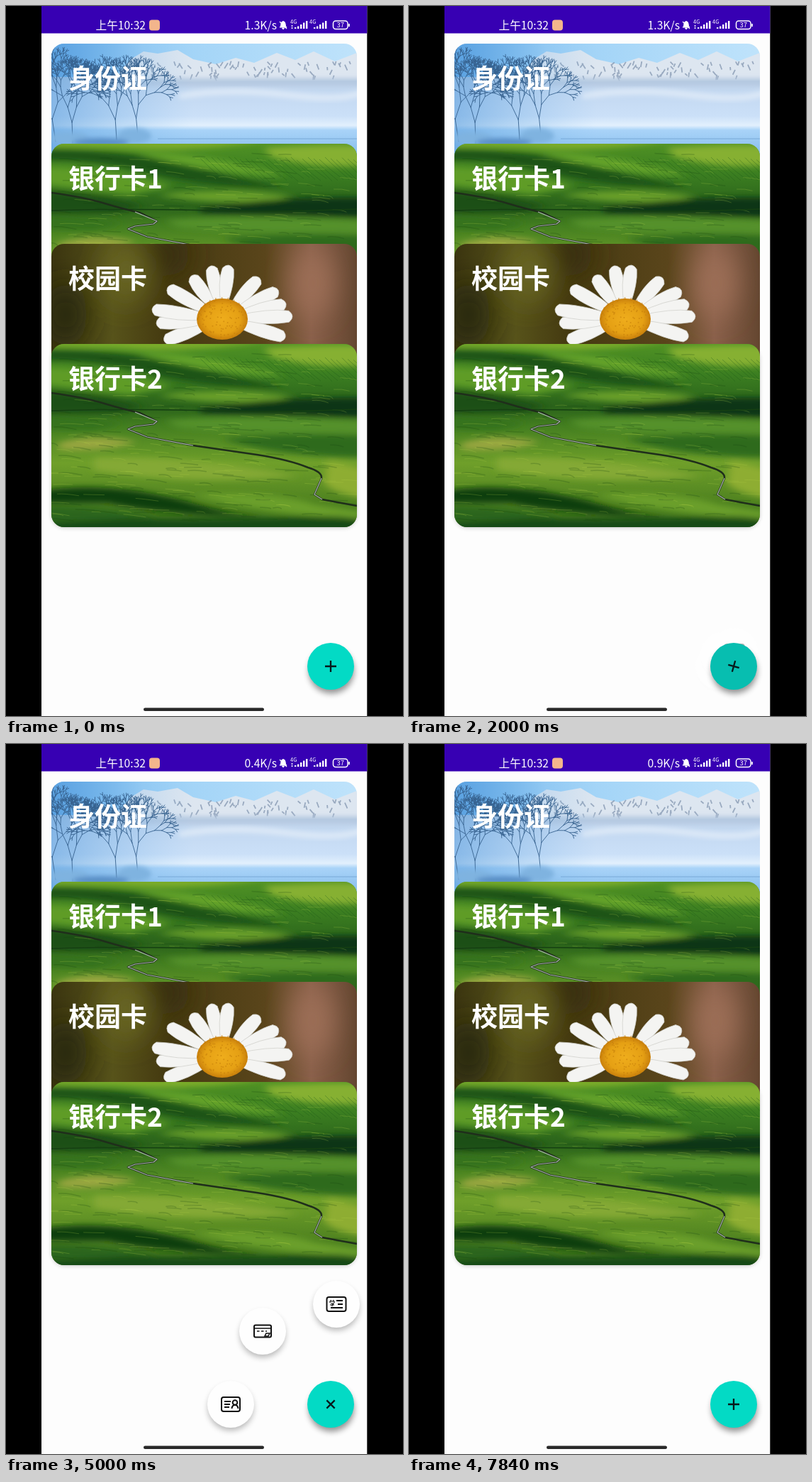
These frames come from a looping animation (560 px wide and 1000 px high, 7.93 s). An HTML page:

```html
<!DOCTYPE html>
<html lang="zh-CN">
<head>
<meta charset="utf-8">
<title>卡包</title>
<style>
html, body { margin: 0; width: 100%; height: 100%; overflow: hidden; background: #000; }
svg { display: block; width: 100vw; height: 100vh; }
text { fill: #fff; font-family: "Noto Sans CJK SC", "Noto Sans CJK", "Noto Sans", sans-serif; }
.title { font-size: 37px; font-weight: 700; }
.line { fill: none; stroke: #111; stroke-width: 2; }
</style>
</head>
<body>
<svg viewBox="0 0 560 1000">
<defs>
  <clipPath id="card"><rect width="431" height="258" rx="18"/></clipPath>
  <filter id="soft" x="-30%" y="-60%" width="160%" height="220%"><feGaussianBlur stdDeviation="6 4"/></filter>
  <filter id="mist" x="-20%" y="-80%" width="140%" height="260%"><feGaussianBlur stdDeviation="3"/></filter>
  <filter id="haze" x="-60%" y="-60%" width="220%" height="220%"><feGaussianBlur stdDeviation="18"/></filter>
  <filter id="drop" x="-50%" y="-50%" width="200%" height="200%"><feGaussianBlur stdDeviation="4.5"/></filter>
  <linearGradient id="sky">
    <stop offset="0" stop-color="#5aa6e6"/><stop offset=".3" stop-color="#9bd0f6"/><stop offset="1" stop-color="#bfe3fb"/>
  </linearGradient>
  <linearGradient id="fog" x2="0" y2="1">
    <stop offset="0" stop-color="#bccee4"/><stop offset=".2" stop-color="#c3d8f1"/>
    <stop offset=".5" stop-color="#cbe0f8"/><stop offset=".62" stop-color="#e2f0fd"/>
    <stop offset=".68" stop-color="#a9d3f8"/><stop offset="1" stop-color="#86bdec"/>
  </linearGradient>
  <linearGradient id="leftTint">
    <stop offset="0" stop-color="#5a9edd" stop-opacity=".6"/><stop offset="1" stop-color="#7cb8ec" stop-opacity="0"/>
  </linearGradient>
  <linearGradient id="grass" x2="0" y2="1">
    <stop offset="0" stop-color="#4f9124"/><stop offset=".16" stop-color="#3c7f21"/>
    <stop offset=".34" stop-color="#2a621a"/><stop offset=".45" stop-color="#447f20"/>
    <stop offset=".65" stop-color="#6f9f2a"/><stop offset="1" stop-color="#3a7019"/>
  </linearGradient>
  <linearGradient id="olive">
    <stop offset="0" stop-color="#3a340f"/><stop offset=".2" stop-color="#57531a"/>
    <stop offset=".38" stop-color="#443910"/><stop offset=".7" stop-color="#5a451b"/>
    <stop offset=".85" stop-color="#8a604a"/><stop offset="1" stop-color="#644630"/>
  </linearGradient>
  <radialGradient id="disc"><stop offset="0" stop-color="#efad1c"/><stop offset=".7" stop-color="#e5a014"/><stop offset="1" stop-color="#c9800c"/></radialGradient>

  <g id="winter" clip-path="url(#card)">
    <rect width="431" height="258" fill="url(#sky)"/>
    <rect y="47" width="431" height="110" fill="url(#fog)"/>
    <path d="M85 54L112 22L130 11L150 14L178 9L200 22L232 29L260 20L286 27L318 13L344 23L370 11L400 25L431 13V52Z" fill="#dde6f0"/>
    <path id="rocks" fill="none" stroke="#7d90ab" stroke-width="1.800" opacity=".7"/>
    <rect x="90" y="49" width="360" height="9" fill="#b4c8e0" filter="url(#mist)"/>
    <path d="M180 74Q250 62 330 72T440 68" fill="none" stroke="#dbe8f7" stroke-width="9" filter="url(#mist)"/>
    <path d="M150 134H431" stroke="#7aaad8" stroke-width="1.200"/>
    <rect width="200" height="160" fill="url(#leftTint)"/>
    <path id="trees" fill="none" stroke="#37628f" stroke-linecap="round" stroke-width=".9"/>
    <g fill="#7fb3e0" filter="url(#mist)"><ellipse cx="25" cy="133" rx="28" ry="9"/><ellipse cx="117" cy="130" rx="24" ry="11"/><ellipse cx="70" cy="139" rx="40" ry="6" fill="#5a8fc6"/></g>
  </g>

  <g id="field" clip-path="url(#card)">
    <rect width="431" height="258" fill="url(#grass)"/>
    <g filter="url(#soft)">
      <path d="M-10 -6H310Q200 14 90 5L-10 3Z" fill="#7fae2c"/>
      <path d="M-10 8Q60 8 120 16Q200 34 330 62Q220 64 130 40Q60 22 -10 24Z" fill="#1c5218"/>
      <path d="M120 12Q240 16 330 46Q240 44 120 12Z" fill="#66a429"/>
      <path d="M300 6Q370 0 445 2V30Q370 36 310 18Z" fill="#86b033"/>
      <path d="M-10 32Q90 34 170 60L110 72L-10 58Z" fill="#5f9c26"/>
      <path d="M-10 66Q60 68 130 88L90 98H-10Z" fill="#1d4f17"/>
      <path d="M150 72Q250 60 340 74L300 82Q210 84 150 72Z" fill="#6ba02c"/>
      <path d="M210 90Q320 74 445 76V104Q320 102 210 98Z" fill="#0f3512"/>
      <path d="M160 108Q280 98 445 108V126Q290 128 180 118Z" fill="#55912a"/>
      <path d="M-10 102Q50 102 100 112L60 122L-10 120Z" fill="#35721e"/>
      <path d="M240 134Q350 122 445 130V160Q330 160 240 134Z" fill="#2d6a1d"/>
      <path d="M10 140Q60 124 120 138Q70 154 10 148Z" fill="#98a63f"/>
      <path d="M60 160Q200 158 350 186Q200 200 60 178Z" fill="#84a934"/>
      <path d="M390 165Q420 170 445 178V218Q390 208 385 195Z" fill="#8ead33"/>
      <path d="M-10 206Q90 192 205 226Q250 240 300 244Q150 240 80 224L-10 224Z" fill="#113c11"/>
      <path d="M-10 230Q80 228 150 246L-10 250Z" fill="#2c651a"/>
      <path d="M200 212Q310 206 372 226L440 236V246Q300 242 200 212Z" fill="#6a9f2a"/>
      <path d="M110 246Q250 248 340 244T445 252V266H-10V252Z" fill="#174a14"/>
    </g>
    <path id="furrows" fill="none" stroke="#1c5717" stroke-width="1" opacity=".35"/>
    <path id="blades" fill="none" stroke="#b2cf4a" stroke-width="1" opacity=".24"/>
    <path id="shades" fill="none" stroke="#143f10" stroke-width="1.500" opacity=".22"/>
    <path d="M0 94Q120 91 220 94T431 92" fill="none" stroke="#153f12" stroke-width="1.500"/>
    <g fill="none" stroke-linejoin="round">
      <path d="M0 69Q45 75 75 84T125 97L149 109L144 113L118 116L108 120L135 131L200 143L290 156Q335 163 362 174Q382 180 381 189L375 203L371 212L382 219L431 228" stroke="#1f2e1b" stroke-width="2.500"/>
      <path d="M118 96L149 109L144 113L118 116L108 120L135 131L200 143M381 189L375 203L371 212L382 219" stroke="#cdd8d3" stroke-width="1.200" opacity=".8"/>
    </g>
  </g>

  <g id="daisy" clip-path="url(#card)">
    <rect width="431" height="258" fill="url(#olive)"/>
    <g filter="url(#haze)">
      <ellipse cx="105" cy="40" rx="32" ry="45" fill="#686521"/>
      <ellipse cx="20" cy="100" rx="30" ry="45" fill="#2c290c"/>
      <ellipse cx="165" cy="15" rx="30" ry="30" fill="#372d0c"/>
      <ellipse cx="368" cy="55" rx="30" ry="50" fill="#9c6e57"/>
    </g>
    <g id="petals" fill="#f4f4f2" stroke="#cfcfca" stroke-width=".7"/>
    <ellipse cx="241" cy="106" rx="36" ry="29" fill="url(#disc)"/>
    <path id="florets" fill="none" stroke="#c47d0a" stroke-width="2" stroke-linecap="round" opacity=".55"/>
  </g>
  <path id="bars" d="M1.200 11V9M5.200 11V7.500M9.200 11V5M13.200 11V2.500M17.200 11V0" stroke="#fff" stroke-width="2.400"/>
</defs>

<rect width="560" height="1000"/>
<rect x="50" width="459.300" height="1000" fill="#fdfdfd"/>
<rect x="50" width="459.300" height="38.500" fill="#3700b3"/>

<g font-weight="500">
  <text x="126.500" y="32.500" font-size="15.700">上午10:32</text>
  <rect x="202" y="19.500" width="15" height="15" rx="4" fill="#f3b58c"/>
  <text id="speed" x="382" y="32.500" font-size="15.700" text-anchor="end"></text>
  <path d="M386 30Q388 29 388 25Q388 22 391 21.500Q394 22 394 25Q394 29 396 30ZM389.500 31H392.500L391 33Z" fill="#fff" stroke="#fff"/>
  <path d="M386 22L396 32" stroke="#fff" stroke-width="1.300"/>
  <text x="401" y="25" font-size="7.500">4G</text>
  <text x="428" y="25" font-size="7.500">4G</text>
  <path d="M403.500 27V32" stroke="#fff" stroke-width="1.500" stroke-dasharray="2 1"/>
  <use href="#bars" x="407" y="21"/>
  <use href="#bars" x="434" y="21"/>
  <rect x="461.500" y="21" width="20.500" height="11.500" rx="3.500" fill="none" stroke="#fff" stroke-width="1.500"/>
  <path d="M484 25V29" stroke="#fff" stroke-width="1.700"/>
  <text x="471.700" y="30.300" font-size="9.500" text-anchor="middle">37</text>
</g>

<rect x="65" y="480" width="429" height="254.500" rx="18" fill="#000" opacity=".25" filter="url(#mist)"/>
<g id="cards"></g>

<g id="items">
  <g><g class="icon line">
    <rect x="-13" y="-10" width="26" height="20" rx="3"/>
    <path d="M-9 -4H0M-9 0H-1M-9 4H-2M1.500 6Q2 1 6 1T10.500 6"/><circle cx="6" cy="-2.500" r="3.300"/>
  </g></g>
  <g><g class="icon line">
    <rect x="-12" y="-8.500" width="24" height="17" rx="2"/>
    <path d="M-12 -4H12M-8 0H-4.500M-2 0H1.500M4 0H6M5 3H10L8 7H3Z" stroke-width="1.600"/>
  </g></g>
  <g><g class="icon line">
    <rect x="-13.500" y="-10" width="27" height="20" rx="3"/>
    <path d="M0 -5H9M2 0H9M-8 5H9"/>
    <path d="M-9 -2V-4H-3V-2M-8 -6L-7.500 -4.500M-4 -6L-4.500 -4.500M-8 -1H-4L-6 1V3M-9 1H-3" style="stroke-width:1.200"/>
  </g></g>
</g>

<g transform="translate(458 930)">
  <circle cx="1" cy="6.500" r="32" opacity=".42" filter="url(#drop)"/>
  <circle r="33" fill="#03dac5"/>
  <circle id="press" r="33" fill="#1b1b30"/>
  <path id="plus" d="M-8 0H8M0 -8V8" stroke="#08191b" stroke-width="2.300"/>
</g>
<rect x="194" y="988.500" width="170" height="4.500" rx="2.250" fill="#292929"/>
</svg>

<script>
const $ = id => document.getElementById(id);
const NS = "http://www.w3.org/2000/svg";
const add = (parent, tag, attrs) => {
  const el = document.createElementNS(NS, tag);
  for (const k in attrs) el.setAttribute(k, attrs[k]);
  return parent.appendChild(el);
};
let seed = 7;
const rnd = (a = 0, b = 1) => {
  seed = (seed * 16807) % 2147483647;
  return a + (b - a) * seed / 2147483647;
};
const repeat = (n, f) => Array.from({ length: n }, (_, i) => f(i)).join("");
const shape = (id, d) => $(id).setAttribute("d", d);

// Scenery
function branch(x, y, angle, len) {
  const x2 = x + Math.cos(angle) * len, y2 = y + Math.sin(angle) * len;
  let d = `M${x.toFixed(1)} ${y.toFixed(1)}L${x2.toFixed(1)} ${y2.toFixed(1)}`;
  if (len > 5) for (const side of [-1, 1])
    d += branch(x2, y2, angle + side * rnd(.15, .6), len * rnd(.7, .86));
  return d;
}
shape("trees", [[6, 138, 32], [30, 140, 29], [92, 135, 28], [122, 130, 25]]
  .map(([x, y, len]) => branch(x, y, -1.57 + rnd(-.15, .15), len)).join(""));
shape("rocks", repeat(80, () => {
  const x = rnd(112, 428), y = rnd(24, 46);
  return `M${x} ${y}l${rnd(-5, 5)} ${rnd(3, 8)}`;
}));
const streaks = (n, top, bottom) => repeat(n, () =>
  `M${rnd(-10, 410)} ${rnd(top, bottom)}q12 ${rnd(-2, 1)} ${rnd(12, 34)} ${rnd(0, 4)}`);
shape("furrows", repeat(28, i => `M${210 + i * 8} ${18 + rnd(0, 5)}q14 14 34 ${26 + rnd(0, 8)}`));
shape("blades", streaks(150, 20, 240));
shape("shades", streaks(150, 10, 250));

// Petal tips around the flower centre
const center = [241, 106];
[[158, 137], [147, 112], [141, 92], [163, 61], [197, 44], [225, 30], [250, 29],
 [294, 47], [321, 65], [332, 84], [341, 102], [331, 132]].forEach(([x, y]) => {
  const dx = x - center[0], dy = y - center[1], len = Math.hypot(dx, dy);
  const turn = Math.atan2(dy, dx) * 180 / Math.PI;
  add($("petals"), "path", {
    d: `M20 -4Q${len * .65} -13 ${len - 6} -8Q${len + 4} 0 ${len - 6} 8Q${len * .65} 12 20 4Z`,
    transform: `translate(${center}) rotate(${turn})`
  });
});
shape("florets", repeat(80, () => {
  const a = rnd(0, 6.28), r = Math.sqrt(rnd());
  return `M${center[0] + Math.cos(a) * r * 34} ${center[1] + Math.sin(a) * r * 27}h.1`;
}) + repeat(13, i => `M${center[0] + 34 * Math.cos(i * .26 + 3.14)} ${center[1] + 28 * Math.sin(i * .26 + 3.14)}v-2`));

[["winter", "身份证"], ["field", "银行卡1"], ["daisy", "校园卡"], ["field", "银行卡2"]].forEach(([scene, label], i) => {
  const y = 53 + i * 141;
  add($("cards"), "use", { href: "#" + scene, x: 64, y: y });
  add($("cards"), "text", { class: "title", x: 88, y: y + 63 }).textContent = label;
});

const items = [...$("items").children].map((el, i) => {
  const face = add(el, "circle", { r: 33, fill: "#fefefe" });
  const shade = add(el, "circle", { cy: 5, r: 32, filter: "url(#drop)" });
  el.prepend(shade, face);
  return { el, shade, icon: el.querySelector(".icon"), to: [[-141, 0], [-96, -103], [8, -141]][i] };
});

// Motion
const LOOP = 7930, MOVE = 400, TURN = 250;
const taps = [[240, 1], [724, 0], [1900, 1], [2816, 0], [4040, 1], [6300, 0]];
const speeds = [[0, "1.3K/s"], [2400, "0.4K/s"], [6400, "0.9K/s"]];
const clamp = v => Math.max(0, Math.min(1, v));
const ease = v => (1 - Math.cos(Math.PI * clamp(v))) / 2;
const last = (list, t) => list.filter(e => e[0] <= t).pop();
const state = (t, span) => {
  const [at, open] = last(taps, t) || [-MOVE, 0];
  const p = ease((t - at) / span);
  return open ? p : 1 - p;
};

function draw(t) {
  const p = state(t, MOVE);
  const alpha = p < .22 ? p / .22 * .45 : p < .56 ? .45 + (p - .22) * .15 : .5 + (p - .56) / .44 * .5;
  for (const { el, shade, icon, to } of items) {
    el.setAttribute("transform", `translate(${458 + to[0] * p} ${930 + to[1] * p})`);
    shade.setAttribute("opacity", .28 * alpha ** 4);
    icon.setAttribute("opacity", alpha);
  }
  $("plus").setAttribute("transform", `rotate(${45 * state(t, TURN)})`);
  const press = Math.max(...taps.map(([at]) =>
    Math.min(clamp((t - at + 130) / 70), clamp((at + 150 - t) / 90))));
  $("press").setAttribute("opacity", .27 * press);
  $("speed").textContent = last(speeds, t)[1];
}

function tick() {
  draw(performance.now() % LOOP);
  requestAnimationFrame(tick);
}
tick();
</script>
</body>
</html>
```
